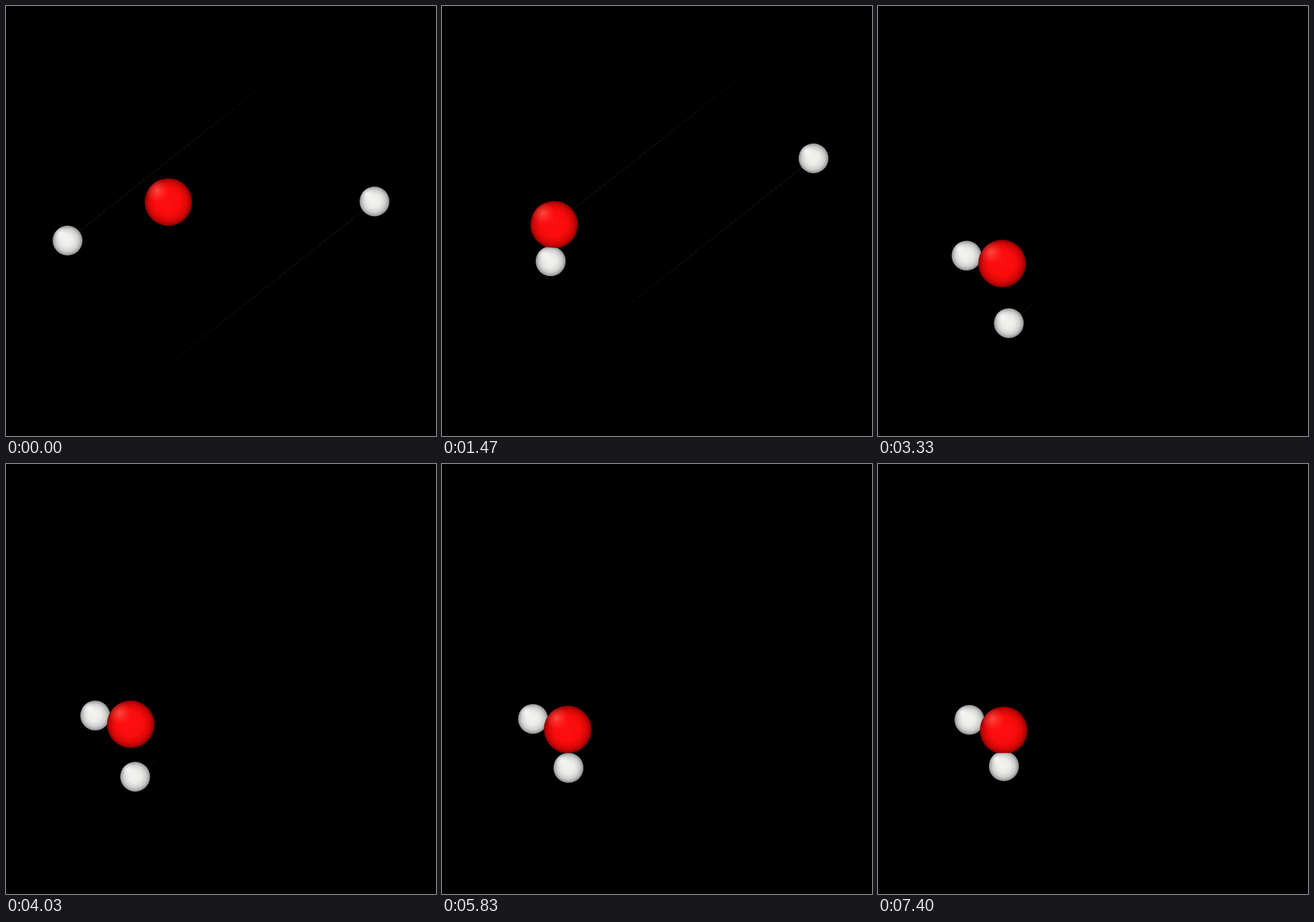
An HTML page with a canvas for the animation above (7430 ms loop, 748 px wide and 748 px high).

```html
<!DOCTYPE html>
<html lang="en">
<head>
<meta charset="utf-8">
<title>Molecule</title>
<style>
html, body { margin: 0; height: 100%; overflow: hidden; background: #000; }
canvas { display: block; }
</style>
</head>
<body>
<canvas id="stage" width="748" height="748"></canvas>
<script>
const ctx = document.getElementById('stage').getContext('2d');
const LOOP = 7430, WRAP = 2500, HANDOVER = 740, SLOPE = 0.793;
const BIG = 41.4, SMALL = 26;

// Monotone cubic curve through the points (ts[i], vs[i])
function curve(ts, vs) {
  const d = ts.slice(1).map((t, i) => (vs[i + 1] - vs[i]) / (t - ts[i]));
  const m = ts.map((_, i) => {
    const a = d[i - 1] ?? d[i], b = d[i] ?? a;
    return a * b <= 0 ? 0 : 2 * a * b / (a + b);
  });
  return t => {
    let i = 0;
    while (i < ts.length - 2 && t > ts[i + 1]) i++;
    const h = ts[i + 1] - ts[i], u = Math.min(1, Math.max(0, (t - ts[i]) / h)), w = 1 - u;
    return w * w * ((1 + 2 * u) * vs[i] + u * h * m[i])
         + u * u * ((3 - 2 * u) * vs[i + 1] - w * h * m[i + 1]);
  };
}

function path(ts, xs, ys) {
  const x = curve(ts, xs), y = curve(ts, ys);
  return t => ({ x: x(t), y: y(t) });
}

const keys = [0, 800, 1470, 2170, 2700, 3330, 4730, 5830, 7400];
const early = [0, 800, 1470, 2170, WRAP];
const late = [WRAP, 2700, 3330, 4730, 5830, 7400];

const leftAtom = path(keys,
  [107, 161, 189, 194, 152, 154, 156.2, 158.3, 159],
  [408, 431, 444, 456, 429, 434.3, 440.2, 443.5, 445]);
const redAtom = path(keys,
  [282.5, 228, 195, 193, 212, 215.8, 217.8, 218.6, 218.6],
  [341, 364, 380.3, 397.5, 440, 448, 456.5, 461.7, 463.3]);
const farAtom = path(early, [641, 648, 646.3, 644, 643], [340, 303, 265, 236, 225]);
const lowAtom = path(late,
  [244, 236, 227.6, 222.7, 220, 219],
  [565, 562, 551.7, 537.5, 528.5, 525.5]);
const topEnd = curve(early, [121, 116, 118, 119, 116]);
const bottomEnd = curve(early, [625, 590, 554, 539, 530]);
const leftStub = curve(late, [26, 26, 25, 25, 22, 20]);
const lowStub = curve(late, [38, 36, 33, 29, 24, 22]);

function line(from, endY) {
  const endX = from.x + (from.y - endY) / SLOPE;
  const g = ctx.createLinearGradient(from.x, from.y, endX, endY);
  g.addColorStop(0, '#201e0d');
  g.addColorStop(0.6, '#1a180a');
  g.addColorStop(1, '#0a0904');
  ctx.strokeStyle = g;
  ctx.lineWidth = 1;
  ctx.beginPath();
  ctx.moveTo(from.x, from.y);
  ctx.lineTo(endX, endY);
  ctx.stroke();
}

function ball({ x, y }, r, stops, shine) {
  ctx.beginPath();
  ctx.arc(x, y, r, 0, 2 * Math.PI);
  const body = ctx.createRadialGradient(x - r * 0.08, y - r * 0.06, 0, x, y, r);
  stops.forEach(([at, colour]) => body.addColorStop(at, colour));
  ctx.fillStyle = body;
  ctx.fill();
  const sx = x - r * 0.47, sy = y - r * 0.48;
  const glow = ctx.createRadialGradient(sx, sy, 0, sx, sy, r * 0.48);
  glow.addColorStop(0, `rgba(${shine},.8)`);
  glow.addColorStop(0.4, `rgba(${shine},.4)`);
  glow.addColorStop(1, `rgba(${shine},0)`);
  ctx.fillStyle = glow;
  ctx.fill();
}

const whiteBall = p => ball(p, SMALL,
  [[0, '#f4f4f2'], [0.45, '#ebebe9'], [0.75, '#cfcfce'], [0.92, '#a5a5a5'], [1, '#808080']],
  '255,255,255');
const redBall = p => ball(p, BIG,
  [[0, '#ff1010'], [0.55, '#fa0c0c'], [0.8, '#d90707'], [0.93, '#ab0303'], [1, '#7c0000']],
  '255,88,76');

// The part of a white ball that stands out of the red one, cut along their common plane
function emerging(p, red) {
  const dx = p.x - red.x, dy = p.y - red.y, d = Math.hypot(dx, dy);
  if (d >= BIG + SMALL) return;
  ctx.save();
  ctx.translate(red.x, red.y);
  ctx.rotate(Math.atan2(dy, dx));
  ctx.beginPath();
  ctx.rect((d * d + BIG * BIG - SMALL * SMALL) / (2 * d), -60, 120, 120);
  ctx.clip();
  ctx.setTransform(1, 0, 0, 1, 0, 0);
  whiteBall(p);
  ctx.restore();
}

function draw(t) {
  const left = leftAtom(t), red = redAtom(t), wrapped = t >= WRAP;
  const other = wrapped ? lowAtom(t) : farAtom(t);
  ctx.fillStyle = '#000';
  ctx.fillRect(0, 0, 748, 748);
  if (wrapped) {
    line(left, left.y - leftStub(t));
    line(other, other.y - lowStub(t));
  } else {
    line(t < HANDOVER ? left : red, topEnd(t));
    line(other, bottomEnd(t));
  }
  whiteBall(left);
  whiteBall(other);
  redBall(red);
  emerging(wrapped ? other : left, red);
}

function tick() {
  draw(performance.now() % LOOP);
  requestAnimationFrame(tick);
}
tick();
</script>
</body>
</html>
```
